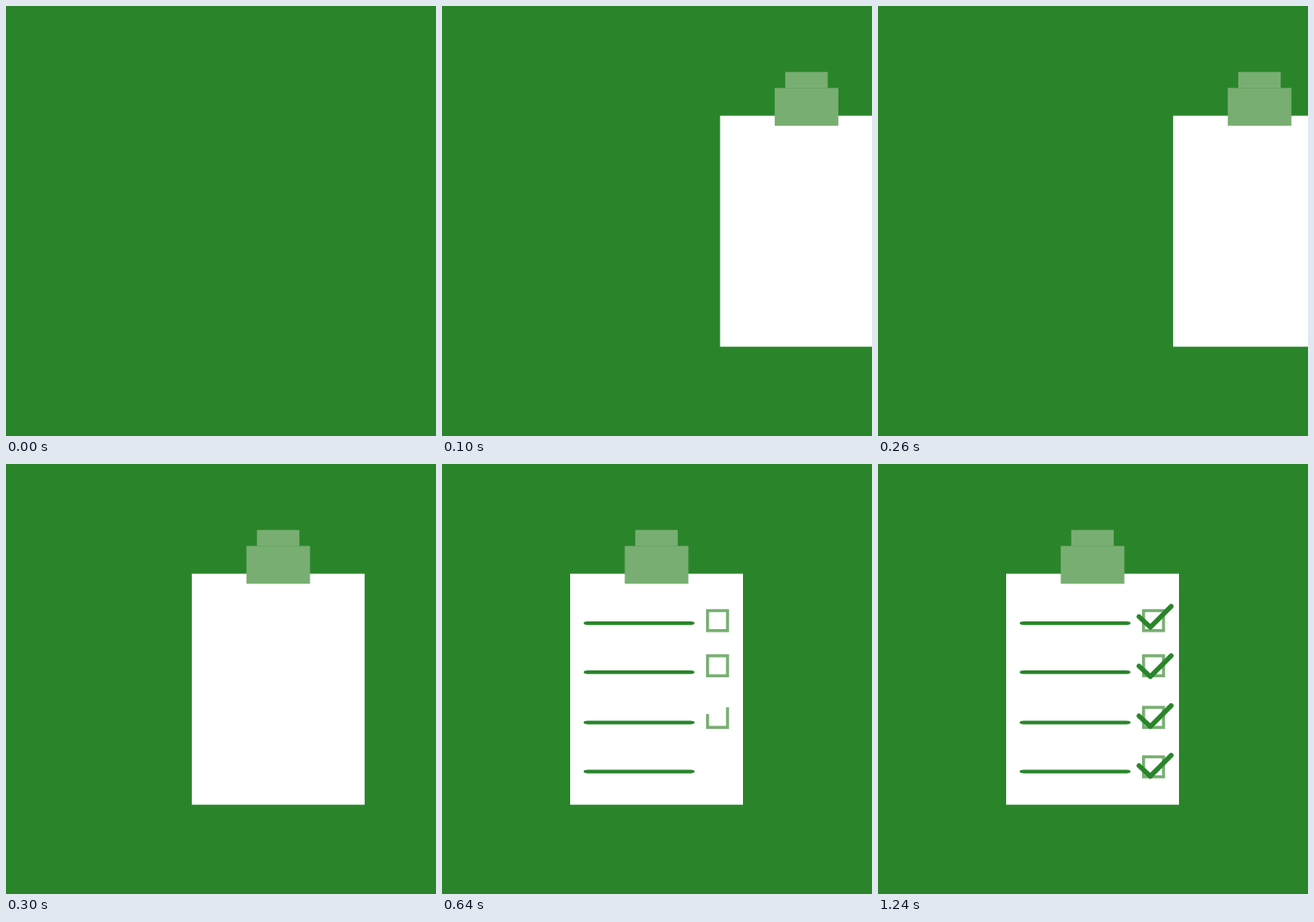
An HTML page with a canvas that plays this animation: 500 px wide and 500 px high, repeating every 1.4 s.

```html
<!DOCTYPE html>
<html lang="en">
<head>
<meta charset="utf-8">
<title>Checklist</title>
<style>
  html, body { margin: 0; height: 100%; overflow: hidden; background: #2a852a; }
  canvas { display: block; }
</style>
</head>
<body>
<canvas width="500" height="500"></canvas>
<script>
const ctx = document.querySelector('canvas').getContext('2d');
const GREEN = '#2a852a', LIGHT = '#79ae72';
const LOOP = 1400, STEP = 20;
const lineY = [183, 240, 298.5, 355.5];
const boxY = [170.5, 223, 283, 340.5];
const checkY = [165.5, 223, 281, 338.8];

const progress = (t, start, duration) => Math.min(1, Math.max(0, (t - start) / duration));
const easeOut = p => 1 - (1 - p) ** 2;

function fillRect(color, x, y, w, h) {
  ctx.fillStyle = color;
  ctx.fillRect(x, y, w, h);
}

// Swings in from the left, leaves on the right and comes back to rest.
function boardOffset(t) {
  return t < 210
    ? -544 + 990 * easeOut(progress(t, 0, 210))
    : 446 * (1 - easeOut(progress(t, 210, 147)));
}

function drawBoard(x) {
  fillRect('#fff', x + 149, 127.6, 201, 268.6);
  fillRect(LIGHT, x + 224.7, 76.7, 49.4, 18.6);
  fillRect(LIGHT, x + 212.5, 95.3, 74, 44);
}

function drawLine(y, p) {
  if (!p) return;
  ctx.fillStyle = GREEN;
  ctx.beginPath();
  ctx.roundRect(164.7, y, 129 * p, 4.2, { x: 5, y: 2.1 });
  ctx.fill();
}

// Strokes the first part p of a path of the given length.
function drawStroke(path, length, p, color, width, cap) {
  if (!p) return;
  ctx.strokeStyle = color;
  ctx.lineWidth = width;
  ctx.lineCap = cap;
  ctx.lineJoin = cap === 'round' ? 'round' : 'miter';
  ctx.setLineDash(p < 1 ? [length * p, length] : []);
  ctx.stroke(new Path2D(path));
}

function draw(t) {
  fillRect(GREEN, 0, 0, 500, 500);
  drawBoard(boardOffset(t));
  for (let i = 0; i < 4; i++) {
    drawLine(lineY[i], progress(t, 360 + i * 50, 50));
    drawStroke(`M332 ${boxY[i]}v23.2h-23.2v-23.2z`, 92.8,
      progress(t, 560 + i * 30, 30), LIGHT, 3.5, 'butt');
    drawStroke(`M303.5 ${checkY[i] + 12}l13.2 12.3l24.2 -24.3`, 52.3,
      progress(t, 680 + i * 140, 140), GREEN, 5.6, 'round');
  }
}

function tick() {
  const t = performance.now() % LOOP;
  draw(Math.floor(t / STEP) * STEP);
  requestAnimationFrame(tick);
}
tick();
</script>
</body>
</html>
```
